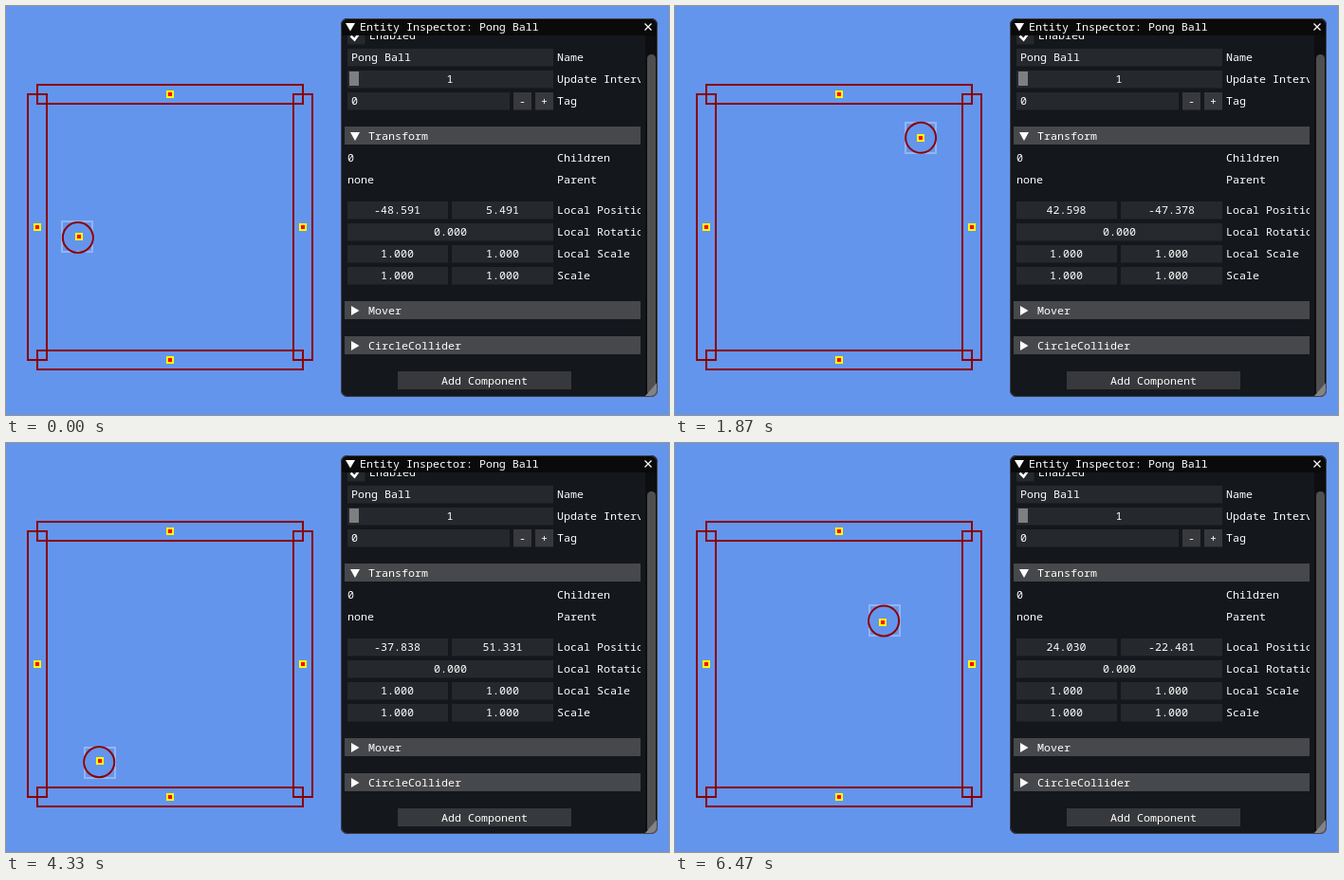
An HTML page that plays this animation: 699 px wide and 431 px high, repeating every 6.54 s.

```html
<!DOCTYPE html>
<html lang="en">
<head>
<meta charset="utf-8">
<title>Entity Inspector</title>
<style>
html, body { margin: 0; width: 100%; height: 100%; overflow: hidden; background: #6495ed; }
svg { display: block; }
text { font: 11.667px "Noto Sans Mono", "DejaVu Sans Mono", monospace; fill: #fff; white-space: pre; }
.line { fill: none; stroke: #8b0000; stroke-width: 2; }
</style>
</head>
<body>
<svg id="stage" width="699" height="431" viewBox="0 0 699 431"></svg>
<script>
const FIELD = '#25282d', HEADER = '#47484b', BUTTON = '#37393d';
const rect = (x, y, w, h, fill, extra = '') =>
  `<rect x="${x}" y="${y}" width="${w}" height="${h}" fill="${fill}" ${extra}/>`;
const label = (x, mid, str, extra = '') => `<text x="${x}" y="${mid + 4}" ${extra}>${str}</text>`;
const centered = (x, mid, str, id = '') => label(x, mid, str, `text-anchor="middle" id="${id}"`);
const poly = (points, fill = '#fff') => `<polygon points="${points}" fill="${fill}"/>`;
const wall = (x, y, w, h) => `<rect class="line" x="${x}" y="${y}" width="${w}" height="${h}"/>`;
const marker = (x, y, id = '') => `<g id="${id}" transform="translate(${x} ${y})">` +
  rect(-4, -4, 8, 8, '#ff0') + rect(-2, -2, 4, 4, '#f00') + '</g>';
const field = (x, mid, w, fill = FIELD) => rect(x, mid - 9, w, 18.5, fill);

function header(mid, name, open) {
  const arrow = open ? `363,${mid - 4} 373,${mid - 4} 368,${mid + 5}`
                     : `364,${mid - 5} 364,${mid + 5} 372.5,${mid}`;
  return rect(357, mid - 10, 312, 19, HEADER) + poly(arrow) + label(382, mid, name);
}

function pair(mid, name, a, b, ids = ['', '']) {
  return field(360, mid, 106) + field(470, mid, 107) +
    centered(412.5, mid, a, ids[0]) + centered(523.5, mid, b, ids[1]) + label(581, mid, name);
}

const scene =
  wall(33, 83, 280, 20) + wall(33, 363, 280, 20) + wall(23, 93, 20, 280) + wall(303, 93, 20, 280) +
  marker(173, 93) + marker(173, 373) + marker(33, 233) + marker(313, 233) +
  '<rect id="bounds" width="32" height="32" fill="none" stroke="#fff" stroke-opacity=".3" stroke-width="2"/>' +
  '<circle id="ball" class="line" r="16"/>' + marker(0, 0, 'center');

const content =
  rect(360, 22, 18.5, 18.5, FIELD) +
  '<path d="M363.5 31.5L367.5 35.5L374.5 26" fill="none" stroke="#fff" stroke-width="2.5"/>' +
  label(383, 31, 'Enabled') +
  field(360, 54, 217) + label(364, 54, 'Pong Ball') + label(581, 54, 'Name') +
  field(360, 77, 217) + rect(362, 69, 10, 15, '#7e7f81') + centered(468, 77, '1') +
  label(581, 77, 'Update Interval') +
  field(360, 100, 171) + label(364, 100, '0') +
  field(535, 100, 19, BUTTON) + centered(544.5, 100, '-') +
  field(558, 100, 19, BUTTON) + centered(567.5, 100, '+') + label(581, 100, 'Tag') +
  header(137, 'Transform', true) +
  label(360, 160, '0') + label(581, 160, 'Children') +
  label(360, 183, 'none') + label(581, 183, 'Parent') +
  pair(215, 'Local Position', '', '', ['posX', 'posY']) +
  field(360, 238, 217) + centered(468.5, 238, '0.000') + label(581, 238, 'Local Rotation') +
  pair(261, 'Local Scale', '1.000', '1.000') +
  pair(284, 'Scale', '1.000', '1.000') +
  header(321, 'Mover') + header(358, 'CircleCollider') +
  rect(413, 385, 183, 19, BUTTON) + centered(504.5, 395, 'Add Component');

const panel =
  '<clipPath id="window"><rect x="353" y="13" width="334" height="399" rx="7"/></clipPath>' +
  '<clipPath id="inner"><rect x="354" y="31" width="315" height="380"/></clipPath>' +
  '<g clip-path="url(#window)">' +
  rect(353, 13, 334, 399, '#14171c') + rect(353, 13, 334, 18, '#0a0a0a') +
  rect(674, 31, 13, 381, '#0d0e11') + rect(676, 51, 9, 359, '#4f4f4f', 'rx="4.5"') +
  poly('687,396 687,412 673,412', '#828385') + '</g>' +
  rect(353.5, 13.5, 333, 398, 'none', 'rx="7" stroke="#40414a"') +
  poly('358,18 368,18 363,26.5') + label(373, 22, 'Entity Inspector: Pong Ball') +
  '<path d="M673.5 18.5L680.5 25.5M680.5 18.5L673.5 25.5" stroke="#fff" stroke-width="1.2"/>' +
  `<g clip-path="url(#inner)">${content}</g>`;

document.getElementById('stage').innerHTML = scene + panel;
const get = id => document.getElementById(id);
const [bounds, ball, center, posX, posY] = ['bounds', 'ball', 'center', 'posX', 'posY'].map(get);

const LOOP = 6540, STEP = 200 / 3, L = 57.1;
const LEAD = 0.1125; // the scene runs slightly ahead of the inspector's numbers

// [step, unfolded x, unfolded y]; bounce() folds these between the walls
const path = [
  [0.93, 2 * L + 48.591, 2 * L - 5.491],
  [20, 4 * L + 10.501, 2 * L + 45.336],
  [36, 6 * L - 39.506, 4 * L - 25.892],
  [49, 6 * L + 12.585, 4 * L + 8.835],
  [65, 8 * L - 37.838, 4 * L + 51.331],
  [79, 8 * L + 18.418, 6 * L - 25.329],
  [97, 10 * L - 24.030, 6 * L + 22.481]
];

function bounce(u) {
  const p = (u + L) % (4 * L);
  return p < 2 * L ? p - L : 3 * L - p;
}

function position(step) {
  step = Math.max(step, path[0][0]);
  let i = 0;
  while (i < path.length - 2 && path[i + 1][0] <= step) i++;
  const a = path[i], b = path[i + 1], f = (step - a[0]) / (b[0] - a[0]);
  return [1, 2].map(n => bounce(a[n] + (b[n] - a[n]) * f));
}

// Steps begin on whole hundredths of a second
function stepAt(t) {
  let k = Math.ceil(t / STEP);
  while (k > 0 && Math.round(k * STEP / 10) * 10 > t) k--;
  return Math.min(k, 97);
}

const toScreen = (x, y) => [173 + 2 * x, 233 + 2 * y];

function draw(now) {
  const k = stepAt(now % LOOP);
  const [tx, ty] = position(k);
  posX.textContent = tx.toFixed(3);
  posY.textContent = ty.toFixed(3);

  const [x, y] = position(k + LEAD);
  const [bx, by] = toScreen(Math.round(x), Math.round(y));
  bounds.setAttribute('x', bx - 16);
  bounds.setAttribute('y', by - 16);
  const [cx, cy] = toScreen(x, y);
  ball.setAttribute('cx', cx);
  ball.setAttribute('cy', cy);
  center.setAttribute('transform', `translate(${toScreen(Math.trunc(x), Math.trunc(y))})`);
}

const start = performance.now();
function tick() {
  draw(performance.now() - start);
  requestAnimationFrame(tick);
}
tick();
</script>
</body>
</html>
```
